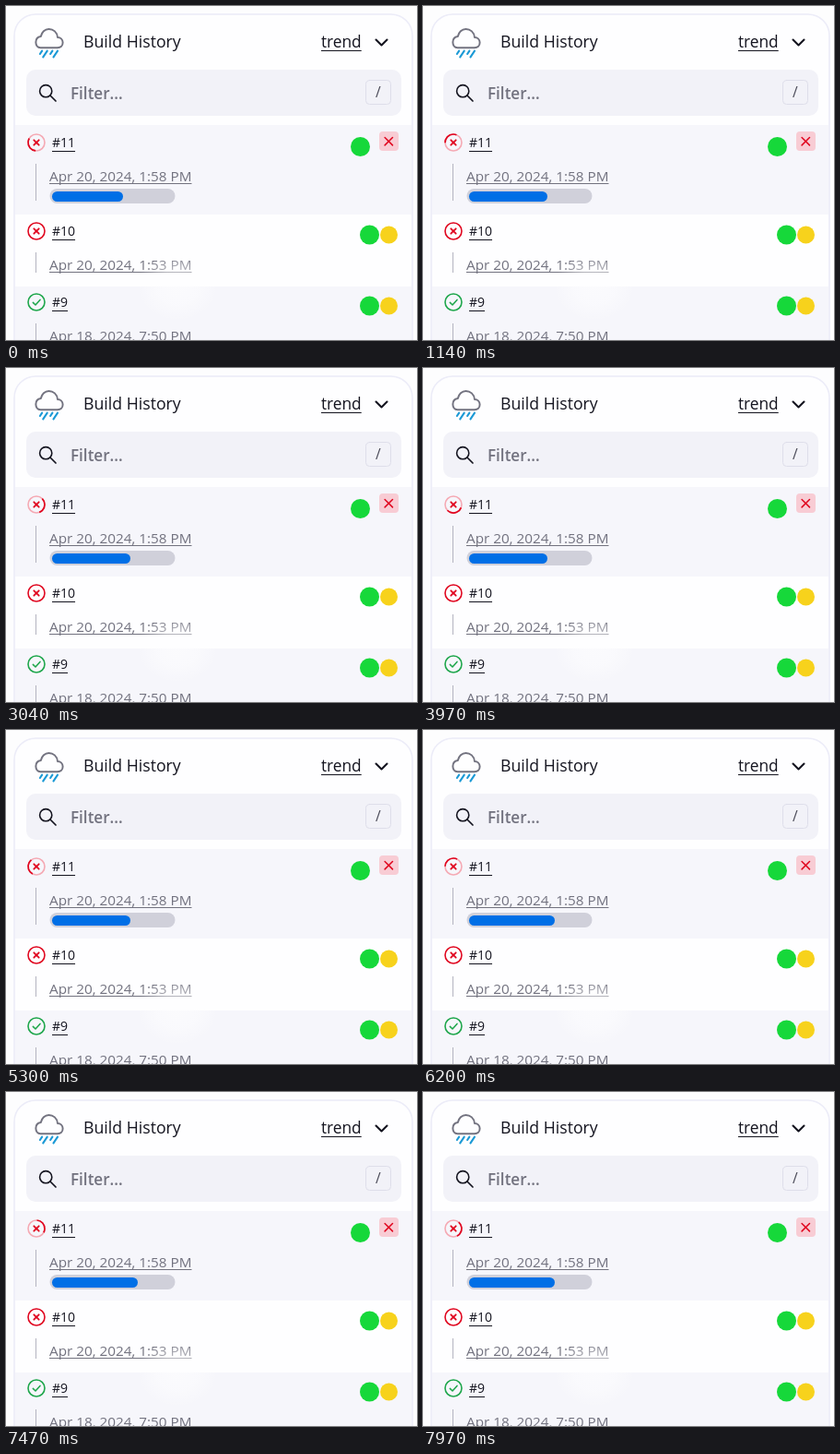
Write an HTML page with a canvas that moves like this. It is 446 px wide and 362 px high and loops after 8000 ms.

```html
<!DOCTYPE html>
<html lang="en">
<head>
<meta charset="utf-8">
<title>Build History</title>
<style>
  html, body { margin: 0; width: 100%; height: 100%; overflow: hidden; background: #fdfdfe; }
  canvas { display: block; width: 446px; height: 362px; }
</style>
</head>
<body>
<canvas id="stage"></canvas>
<script>
const W = 446, H = 362, LOOP = 8000, SPIN = 5000;
const INK = '#14141f', MUTED = '#72727f', RED = '#e0061f', GREEN = '#1ea64b';
const PAGE = '#fdfdfe', CARD = '#fefeff', ROW = '#f6f6fb';
const canvas = document.getElementById('stage');
const ctx = canvas.getContext('2d');
const dpr = window.devicePixelRatio || 1;
canvas.width = W * dpr;
canvas.height = H * dpr;

const cloud = new Path2D(
  'M120 336C72 336 48 296 48 252C48 200 84 168 125 162C138 96 188 48 248 48' +
  'C318 48 378 96 384 176C430 178 464 210 464 256C464 306 430 336 384 336Z');

function box(x, y, w, h, r, fill, stroke, lineWidth = 1) {
  ctx.beginPath();
  ctx.roundRect(x, y, w, h, r);
  if (fill) { ctx.fillStyle = fill; ctx.fill(); }
  if (stroke) { ctx.strokeStyle = stroke; ctx.lineWidth = lineWidth; ctx.stroke(); }
}

function line(points, color, width, cap = 'round') {
  ctx.beginPath();
  points.forEach(([x, y], i) => i ? ctx.lineTo(x, y) : ctx.moveTo(x, y));
  ctx.strokeStyle = color;
  ctx.lineWidth = width;
  ctx.lineCap = cap;
  ctx.lineJoin = 'round';
  ctx.stroke();
}

function arc(x, y, r, color, width, from = 0, to = Math.PI * 2) {
  ctx.beginPath();
  ctx.arc(x, y, r, from, to);
  ctx.strokeStyle = color;
  ctx.lineWidth = width;
  ctx.lineCap = 'butt';
  ctx.stroke();
}

function disc(x, y, r, color) {
  ctx.beginPath();
  ctx.arc(x, y, r, 0, Math.PI * 2);
  ctx.fillStyle = color;
  ctx.fill();
}

function text(str, x, y, size, color, { weight = 400, under = 0 } = {}) {
  ctx.font = `${weight} ${size}px "Open Sans", "Noto Sans", sans-serif`;
  ctx.fillStyle = color;
  ctx.fillText(str, x, y);
  if (under) ctx.fillRect(x, y + under, ctx.measureText(str).width, 1);
}

function cross(x, y, r, width) {
  line([[x - r, y - r], [x + r, y + r]], RED, width);
  line([[x + r, y - r], [x - r, y + r]], RED, width);
}

// Drawn in a 512-unit icon grid; the drops alternate short and long.
function weather() {
  ctx.save();
  ctx.translate(29, 21.6);
  ctx.scale(36 / 512, 36 / 512);
  ctx.strokeStyle = '#737380';
  ctx.lineWidth = 28;
  ctx.stroke(cloud);
  for (let i = 0; i < 4; i++) {
    const x = 144 + i * 80, drop = i % 2 ? 64 : 32;
    line([[x, 384], [x - drop, 384 + drop * 1.5]], '#1c9ad6', 30);
  }
  ctx.restore();
}

function header() {
  weather();
  text('Build History', 84, 45, 17.7, INK, { weight: 500 });
  text('trend', 342, 45, 17.3, INK, { weight: 500, under: 3 });
  line([[401.5, 36.5], [407.5, 42.5], [413.5, 36.5]], INK, 2.1);
  box(22, 69, 407, 50, 10, '#f2f2f8');
  arc(43.2, 92.2, 6.6, INK, 1.6);
  line([[48, 97], [54, 103]], INK, 1.7);
  text('Filter...', 70, 101, 17.1, MUTED, { weight: 600 });
  box(390.5, 80.5, 27, 26, 4, null, '#dedeea');
  text('/', 401, 99, 15.5, '#4a4a58', { weight: 500 });
}

function status(y, kind, t) {
  if (kind === 'running') {
    const mid = Math.PI * (0.85 + 2 * t / SPIN);
    arc(33, y, 9, '#f5a9b3', 1.6);
    arc(33, y, 9, RED, 1.7, mid - 1, mid + 1);
  } else {
    arc(33, y, 9, kind === 'passed' ? GREEN : RED, 1.6);
  }
  if (kind === 'passed') line([[29.3, y + .4], [32, y + 3], [37, y - 2.6]], GREEN, 1.5);
  else cross(33, y, 2.7, 1.8);
}

function build(top, name, date, kind, railEnd, t) {
  status(top + 19, kind, t);
  text(name, 50, top + 24, 14, INK, { weight: 500, under: 4 });
  line([[32.5, top + 42], [32.5, railEnd]], '#b4b4c0', 1, 'butt');
  text(date, 47, top + 61, 15.3, MUTED, { under: 2 });
}

// The bar is refreshed every five seconds.
function progress(t) {
  const steps = Math.floor((t + 4000) / 5000);
  box(47.5, 198, 136, 16, 8, '#d0d0da');
  box(50, 201, 77 + 8 * steps, 11, 5.5, '#006fe6');
}

function glow() {
  ctx.save();
  ctx.translate(186, 304);
  ctx.scale(1, 0.85);
  const g = ctx.createRadialGradient(0, 0, 0, 0, 0, 44);
  g.addColorStop(0, 'rgba(254,254,255,.6)');
  g.addColorStop(.5, 'rgba(254,254,255,.45)');
  g.addColorStop(1, 'rgba(254,254,255,0)');
  ctx.fillStyle = g;
  ctx.fillRect(-44, -44, 88, 88);
  ctx.restore();
}

function badges(y) {
  disc(394.5, y, 10.5, '#16d83a');
  disc(415.5, y, 9.5, '#f7d21c');
}

function draw(t) {
  ctx.setTransform(dpr, 0, 0, dpr, 0, 0);
  ctx.fillStyle = PAGE;
  ctx.fillRect(0, 0, W, H);
  box(9, 9, 432, 400, 23, CARD, '#ececf8', 1.6);
  header();
  ctx.fillStyle = ROW;
  ctx.fillRect(10, 129, 430, 97);
  ctx.fillRect(10, 304, 430, 58);

  build(129, '#11', 'Apr 20, 2024, 1:58 PM', 'running', 211, t);
  progress(t);
  disc(384.5, 152.5, 10.5, '#16d83a');
  box(405, 136, 21, 21, 4, '#f8ccd4');
  cross(415.3, 146.7, 4.2, 1.5);

  build(225, '#10', 'Apr 20, 2024, 1:53 PM', 'failed', 289, t);
  badges(248);
  build(302, '#9', 'Apr 18, 2024, 7:50 PM', 'passed', H, t);
  badges(325);
  glow();
}

const start = performance.now();
function tick() {
  draw((performance.now() - start) % LOOP);
  requestAnimationFrame(tick);
}
tick();
</script>
</body>
</html>
```
